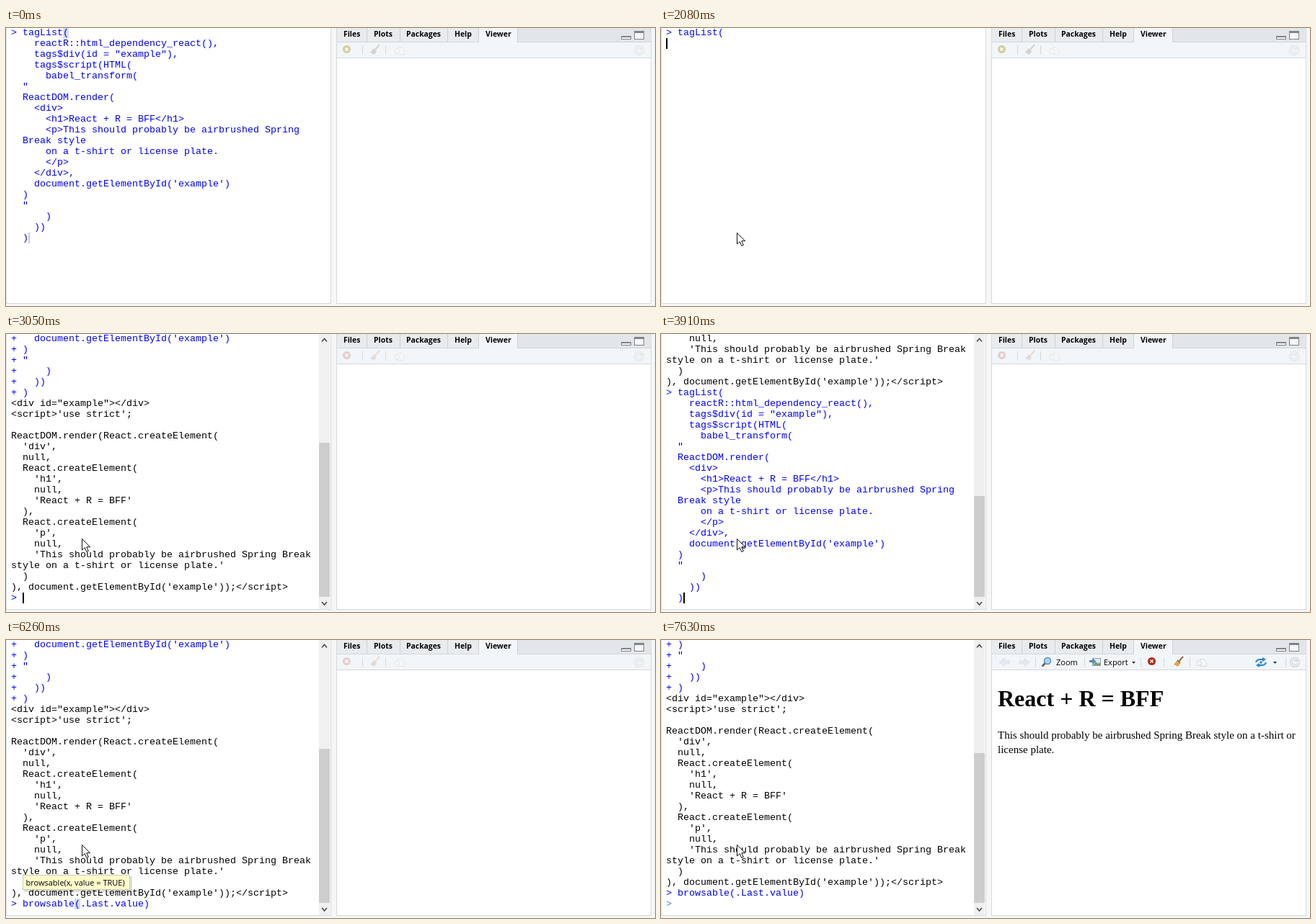
An HTML page for the animation above (8 s loop, 900 px wide and 386 px high).

```html
<!DOCTYPE html>
<html lang="en">
<head>
<meta charset="utf-8">
<title>R console and viewer</title>
<style>
  html, body { margin: 0; width: 100%; height: 100%; overflow: hidden; background: #f5f6f8; }
  svg { display: block; width: 900px; height: 386px; }
  text { white-space: pre; }
  .crisp { shape-rendering: crispEdges; }
  #rows { font: 13.333px "Liberation Mono", monospace; }
  .ui { font: 11px "Open Sans", sans-serif; }
  .tabs { font: 700 10.4px "Open Sans", sans-serif; }
  .page { font: 15px "Liberation Serif", serif; }
  .page .title { font-size: 32px; font-weight: 700; }
  .line { fill: none; stroke-width: 1.5; }
</style>
</head>
<body>
<svg viewBox="0 0 900 386">
  <defs>
    <g id="broom">
      <path d="M13 0 L7 7" class="line" stroke="#9a6a3c" style="stroke-width:2"/>
      <path d="M5 5 L9 9 L6 14 L0 11 Z" fill="#dca850"/>
      <path d="M5 5 L9 9" class="line" stroke="#8a6a40"/>
    </g>
    <g id="paleBroom">
      <path d="M13 0 L7 7" class="line" stroke="currentColor" style="stroke-width:2"/>
      <path d="M5 5 L9 9 L6 14 L0 11 Z" fill="currentColor"/>
    </g>
    <g id="publish" fill="#f4f6f7" stroke="currentColor">
      <path d="M5.5 2.5 h5 l4 4 v6 h-9 z"/>
      <circle cx="4" cy="8" r="3.5"/>
    </g>
    <g id="refresh" class="line" stroke="currentColor">
      <circle cx="7" cy="7" r="6.5"/>
      <path d="M10 5 A3.6 3.6 0 1 0 10.5 8 M10.5 2.5 V5.5 H7.5"/>
    </g>
    <g id="stop">
      <circle cx="5.5" cy="5.5" r="5.5"/>
      <path d="M3.5 3.5 l4 4 m0 -4 l-4 4" stroke="#fff" stroke-width="1.6"/>
    </g>
    <path id="drop" d="M0 0 h5 l-2.5 3 z" fill="#333"/>
    <path id="arrow" d="M14 4 H7 V0.5 L0 6 L7 11.5 V8 H14 Z" fill="#e3ebf0" stroke="#d8e2e8"/>
  </defs>

  <g class="crisp">
    <rect width="451" height="383" fill="#d6dadd"/>
    <rect x="1" width="449" height="382" fill="#fff"/>
    <rect x="458" width="437" height="383" fill="#d6dadd"/>
    <rect x="459" width="435" height="382" fill="#fff"/>
    <rect x="459" width="435" height="20" fill="#e3e6e8"/>
    <rect x="459" width="197" height="19" fill="#e9ecee"/>
    <rect x="459" y="19" width="435" height="1" fill="#d3d7da"/>
    <rect x="459" y="20" width="435" height="21" fill="#f2f6f9"/>
    <rect x="656" width="53" height="20" fill="#f2f6f9"/>
    <rect x="459" y="41" width="435" height="1" fill="#d3d8dc"/>
    <path d="M500.5 0 V19 M546.5 0 V19 M612.5 0 V19 M655.5 0 V19 M709.5 0 V19" stroke="#cdd1d4"/>
    <path d="M853.5 11.5 h13 v4 h-13 z M871.5 4.5 h13 v11 h-13 z" fill="#f5f6f7" stroke="#808488"/>
    <path d="M853 11 h14 v2 h-14 z M871 4 h14 v3 h-14 z" fill="#808488"/>
  </g>
  <g class="tabs">
    <text x="468" y="12">Files</text>
    <text x="510" y="12">Plots</text>
    <text x="555" y="12">Packages</text>
    <text x="622" y="12">Help</text>
    <text x="665" y="12">Viewer</text>
  </g>

  <g id="idleBar" color="#e5e8ea">
    <use id="idleStop" href="#stop" x="467" y="24"/>
    <path class="crisp" d="M494.5 24 V37 M526.5 24 V37" stroke="#d3d8db"/>
    <use id="idleBroom" href="#paleBroom" x="505" y="23"/>
    <use href="#publish" x="538" y="24"/>
    <use href="#refresh" x="871" y="24"/>
  </g>
  <g id="liveBar" class="ui" color="#d3d9dc">
    <use href="#arrow" x="469" y="25"/>
    <use href="#arrow" transform="translate(511 25) scale(-1 1)"/>
    <path class="crisp" d="M519.5 24 V37 M587.5 24 V37 M665.5 24 V37 M697.5 24 V37 M733.5 24 V37 M866.5 24 V37" stroke="#d3d8db"/>
    <path d="M533 32 L528.5 36.5" stroke="#6b5a50" stroke-width="2.5"/>
    <circle cx="536" cy="29" r="4.5" fill="#a9d8f2" stroke="#5a8fb5" stroke-width="1.5"/>
    <text x="548" y="35">Zoom</text>
    <rect x="598.5" y="25.5" width="11" height="10" fill="#dcebf5" stroke="#8fa3b3"/>
    <path d="M599 35 l4 -5 3 3 2 -2 2 4 z" fill="#7b9a62"/>
    <path d="M594 28 h5 v-2.5 l4 4 -4 4 v-2.5 h-5 z" fill="#4a86b8"/>
    <text x="614" y="35">Export</text>
    <use href="#drop" x="653" y="30"/>
    <use href="#stop" x="675" y="24" fill="#b8241a"/>
    <use href="#broom" x="711" y="23"/>
    <use href="#publish" x="742" y="24"/>
    <g class="line" stroke="#1f86cc" style="stroke-width:2">
      <path d="M825 31 Q826 27 831 27 H835 M839 31 Q838 35 833 35 H829"/>
    </g>
    <circle cx="832" cy="31" r="1.7" fill="#1f86cc"/>
    <path d="M834 24 l5 3 -5 3 z M830 32 l-5 3 5 3 z" fill="#1f86cc"/>
    <use href="#drop" x="849" y="30"/>
    <use href="#refresh" x="872" y="24"/>
  </g>
  <g id="page" class="page">
    <text class="title" x="467" y="92">React + R = BFF</text>
    <text x="467" y="137">This should probably be airbrushed Spring Break style on a t-shirt or</text>
    <text x="467" y="157">license plate.</text>
  </g>

  <rect id="match" class="crisp" width="8" height="15" fill="#d3dfee"/>
  <g id="rows"></g>
  <rect id="caret" class="crisp" width="2" height="15"/>

  <g id="scrollbar">
    <rect class="crisp" x="434" width="15" height="382" fill="#f0f0f0"/>
    <rect id="thumb" class="crisp" x="434" width="15" fill="#cdcdcd"/>
    <path class="line" d="M438 10.5 l3.5 -4 3.5 4 M438 372 l3.5 4 3.5 -4" stroke="#4a4a4a"/>
  </g>
  <g id="tip" class="ui">
    <rect x="25" y="328" width="150" height="22" fill="#000" opacity=".13"/>
    <rect x="23.5" y="326.5" width="148" height="20" fill="#ffffcc" stroke="#c9c9b4"/>
    <text x="27.5" y="341">browsable(x, value = TRUE)</text>
  </g>
  <path id="pointer" d="M.5 .5 V16 L4.2 12.6 L6.8 18.5 L9.3 17.4 L6.8 11.7 H11.6 Z" fill="#fff" stroke="#111"/>
</svg>

<script>
const LOOP = 8000, ROWS = 25, PITCH = 15, CHAR = 8, LEFT = 7;
const $ = id => document.getElementById(id);
const BLUE = '#0000ff', BLACK = '#000', FADED = '#4684c4';
const paint = (lines, color) => lines.map(text => ({ text, color }));

const source = `tagList(
  reactR::html_dependency_react(),
  tags$div(id = "example"),
  tags$script(HTML(
    babel_transform(
"
ReactDOM.render(
  <div>
    <h1>React + R = BFF</h1>
    <p>This should probably be airbrushed Spring
Break style
    on a t-shirt or license plate.
    </p>
  </div>,
  document.getElementById('example')
)
"
    )
  ))
)`.split('\n');

const output = paint(`<div id="example"></div>
<script>'use strict';

ReactDOM.render(React.createElement(
  'div',
  null,
  React.createElement(
    'h1',
    null,
    'React + R = BFF'
  ),
  React.createElement(
    'p',
    null,
    'This should probably be airbrushed Spring Break
style on a t-shirt or license plate.'
  )
), document.getElementById('example'));<\/script>`.split('\n'), BLACK);

const input = paint(source.map((s, i) => (i ? '  ' : '> ') + s), BLUE);
const echo = paint(source.map((s, i) =>
  i === 0 ? '> ' + s : s === 'Break style' ? s : '+ ' + s), BLUE);
const blank = paint([''], BLUE);
const prompt = color => paint(['> '], color);
const call = paint(['> browsable(.Last.value)'], BLUE);
const history = [...echo, ...output];
const echoed = n => [...echo.slice(0, n), ...blank];

// Console contents: start time, lines
const screens = [
  [0, input], [2080, echoed(1)], [2240, echoed(5)], [2320, echoed(10)],
  [2390, echoed(15)], [2470, echoed(20)], [3050, [...history, ...prompt(BLUE)]],
  [3910, [...history, ...input]], [4670, [...history, ...call]],
  [6590, [...history, ...call, ...blank]], [7050, [...history, ...call, ...prompt(FADED)]]
];
const caretOff = [[1630, 1930], [2650, 3050], [3600, 3910], [4540, 4670],
  [5310, 5710], [6260, 6590], [7630, LOOP]];

const rows = Array.from({ length: ROWS }, (_, i) => {
  const row = document.createElementNS('http://www.w3.org/2000/svg', 'text');
  row.setAttribute('x', LEFT);
  row.setAttribute('y', 10 + i * PITCH);
  return $('rows').appendChild(row);
});

const within = (t, a, b) => t >= a && t < b;
const show = (id, on) => { $(id).style.display = on ? '' : 'none'; };
const place = (id, col, row) => {
  $(id).setAttribute('x', LEFT + col * CHAR);
  $(id).setAttribute('y', row * PITCH - 1);
};

function drawConsole(lines) {
  const view = lines.slice(-ROWS);
  rows.forEach((row, i) => {
    const { text, color } = view[i] || blank[0];
    row.textContent = text;
    row.setAttribute('fill', color);
  });
  const last = view.length - 1;
  place('caret', view[last].text.length, last);
  // The bracket that pairs with the closing one before the caret
  if (view[last] === call[0]) place('match', 11, last);
  else place('match', 9, Math.max(0, view.indexOf(input[0])));

  show('scrollbar', lines.length > ROWS);
  const size = 115400 / (lines.length * PITCH - 46);
  $('thumb').setAttribute('y', Math.round(365 - size));
  $('thumb').setAttribute('height', Math.round(size));
}

function pointerAt(t) {
  if (t >= 1060) return [105, 284];
  if (t >= 1000) return [105, 278];
  if (t >= 770) return [105, 272];
  const step = Math.floor((t - 150) / 77.5) / 7;
  const ease = 1 - (1 - step) ** 2;
  return [617 - 513 * ease, 341 - 77 * ease];
}

let current;
function render(t) {
  const lines = screens.filter(s => s[0] <= t).pop()[1];
  if (lines !== current) drawConsole(current = lines);

  show('caret', !caretOff.some(([a, b]) => within(t, a, b)));
  $('caret').setAttribute('fill', t < 1000 ? '#ccc' : BLACK);
  show('match', t < 2080 || within(t, 3970, 4670) || within(t, 4800, 6590));
  show('tip', within(t, 5860, 6590));
  // The tooltip hides the short line it overlaps
  rows[22].style.visibility = within(t, 5860, 6590) ? 'hidden' : '';

  show('idleBar', t < 7050);
  $('idleStop').setAttribute('fill', t < 3050 ? '#d3cda2' : '#e2cfcc');
  $('idleBroom').setAttribute('color', t < 3050 ? '#d3d4d2' : '#e4dcd8');
  show('liveBar', t >= 7050);
  show('page', t >= 7550);

  show('pointer', t >= 150);
  if (t >= 150) $('pointer').setAttribute('transform', `translate(${pointerAt(t)})`);
}

const start = performance.now();
function tick() {
  render((performance.now() - start) % LOOP);
  requestAnimationFrame(tick);
}
tick();
</script>
</body>
</html>
```
